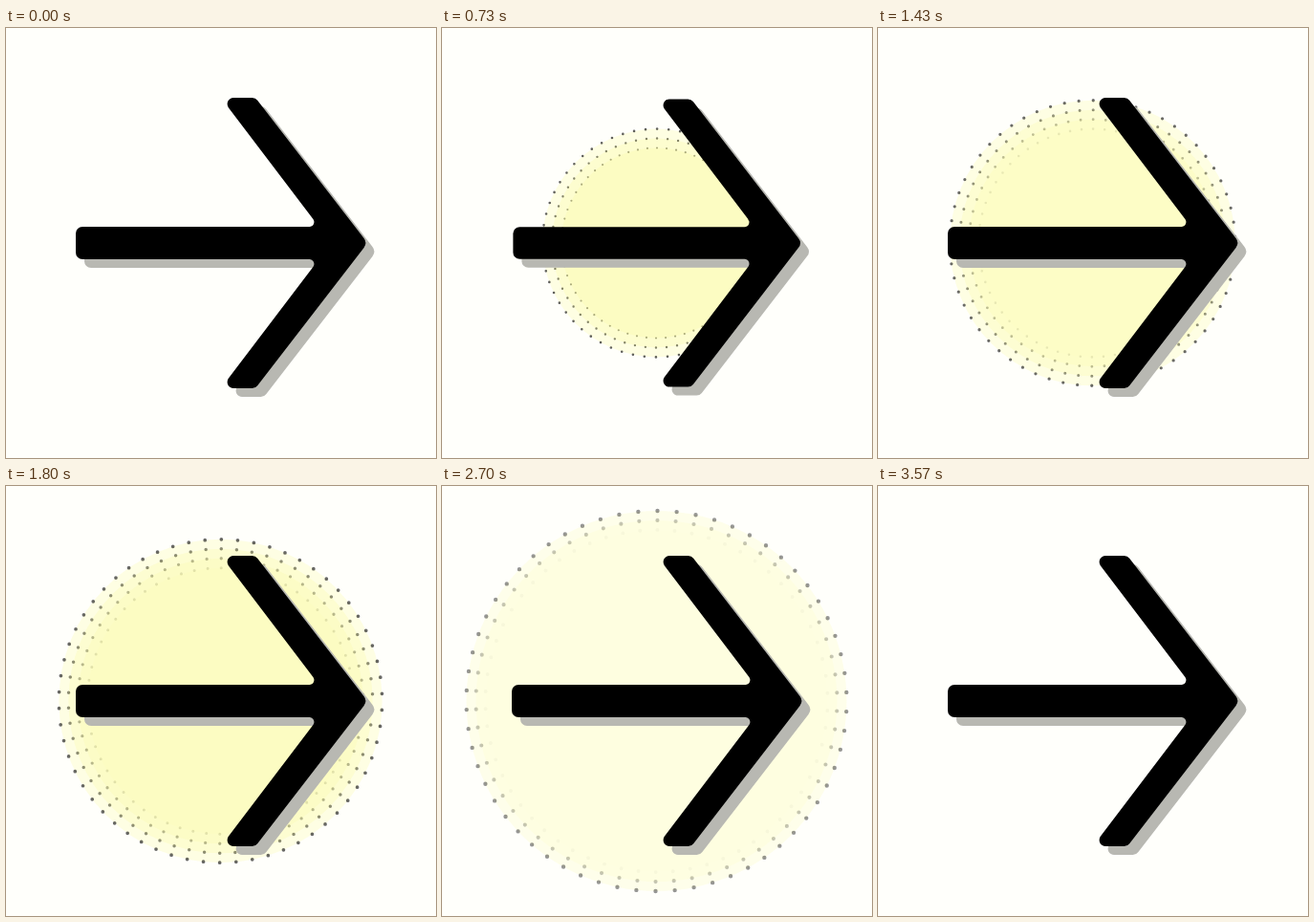
These frames come from a looping animation (450x450 px, 3.61 s). An HTML page with a canvas:

```html
<!DOCTYPE html>
<html lang="en">
<head>
<meta charset="utf-8">
<title>Arrow ripple</title>
<style>
  html, body { margin: 0; width: 100%; height: 100%; overflow: hidden; background: #fffffb; }
  canvas { display: block; width: 100vw; height: 100vh; }
</style>
</head>
<body>
<canvas id="stage" width="450" height="450"></canvas>
<script>
const ctx = document.getElementById('stage').getContext('2d');
const LOOP = 3610;
const CENTER = { x: 224.5, y: 225 };
const RING = { count: 11, first: 300, gap: 200, life: 830, radius: 99.5, step: 9.95, dots: 62, turn: 0.005 };
const PRESS = { time: 800, depth: 0.128 };

// Upper half of the arrow as [x, y, corner radius], relative to the center.
const upper = [
  [-151.5, -17, 7],
  [103, -17, 5],
  [0.5, -152, 6.5],
  [36.6, -152, 7]
];
const tip = [153.8, 0, 8];
const lower = upper.map(([x, y, r]) => [x, -y, r]).reverse();
const corners = [...upper, tip, ...lower];

const arrow = new Path2D();
arrow.moveTo(-151.5, 0);
corners.forEach(([x, y, r], i) => {
  const [nx, ny] = corners[(i + 1) % corners.length];
  arrow.arcTo(x, y, nx, ny, r);
});
arrow.closePath();

function drawRing(index, time) {
  const age = time - RING.first - index * RING.gap;
  if (age < 0 || age >= RING.life) return;
  const alpha = 1 - (age / RING.life) ** 1.5;
  const radius = RING.radius + index * RING.step;

  ctx.globalAlpha = alpha * 0.1;
  ctx.fillStyle = '#eeee00';
  ctx.beginPath();
  ctx.arc(CENTER.x, CENTER.y, radius, 0, 2 * Math.PI);
  ctx.fill();

  ctx.globalAlpha = alpha * 0.62;
  ctx.fillStyle = '#000';
  ctx.beginPath();
  for (let i = 0; i < RING.dots; i++) {
    const angle = i / RING.dots * 2 * Math.PI - Math.PI / 2 + RING.turn;
    const x = CENTER.x + radius * Math.cos(angle);
    const y = CENTER.y + radius * Math.sin(angle);
    ctx.moveTo(x, y);
    ctx.arc(x, y, radius * 0.011, 0, 2 * Math.PI);
  }
  ctx.fill();
  ctx.globalAlpha = 1;
}

function drawArrow(scale, offset, color) {
  ctx.save();
  ctx.translate(CENTER.x + offset, CENTER.y + offset);
  ctx.scale(scale, scale);
  ctx.fillStyle = color;
  ctx.fill(arrow);
  ctx.restore();
}

function pressScale(time) {
  if (time >= PRESS.time) return 1;
  return 1 - PRESS.depth * (1 - Math.cos(2 * Math.PI * time / PRESS.time)) / 2;
}

function draw(time) {
  ctx.fillStyle = '#fffffb';
  ctx.fillRect(0, 0, 450, 450);
  for (let i = 0; i < RING.count; i++) drawRing(i, time);
  const scale = pressScale(time);
  drawArrow(scale, 9, '#b8b8b2');
  drawArrow(scale, 0, '#000');
}

const start = performance.now();
function tick() {
  draw((performance.now() - start) % LOOP);
  requestAnimationFrame(tick);
}
tick();
</script>
</body>
</html>
```
